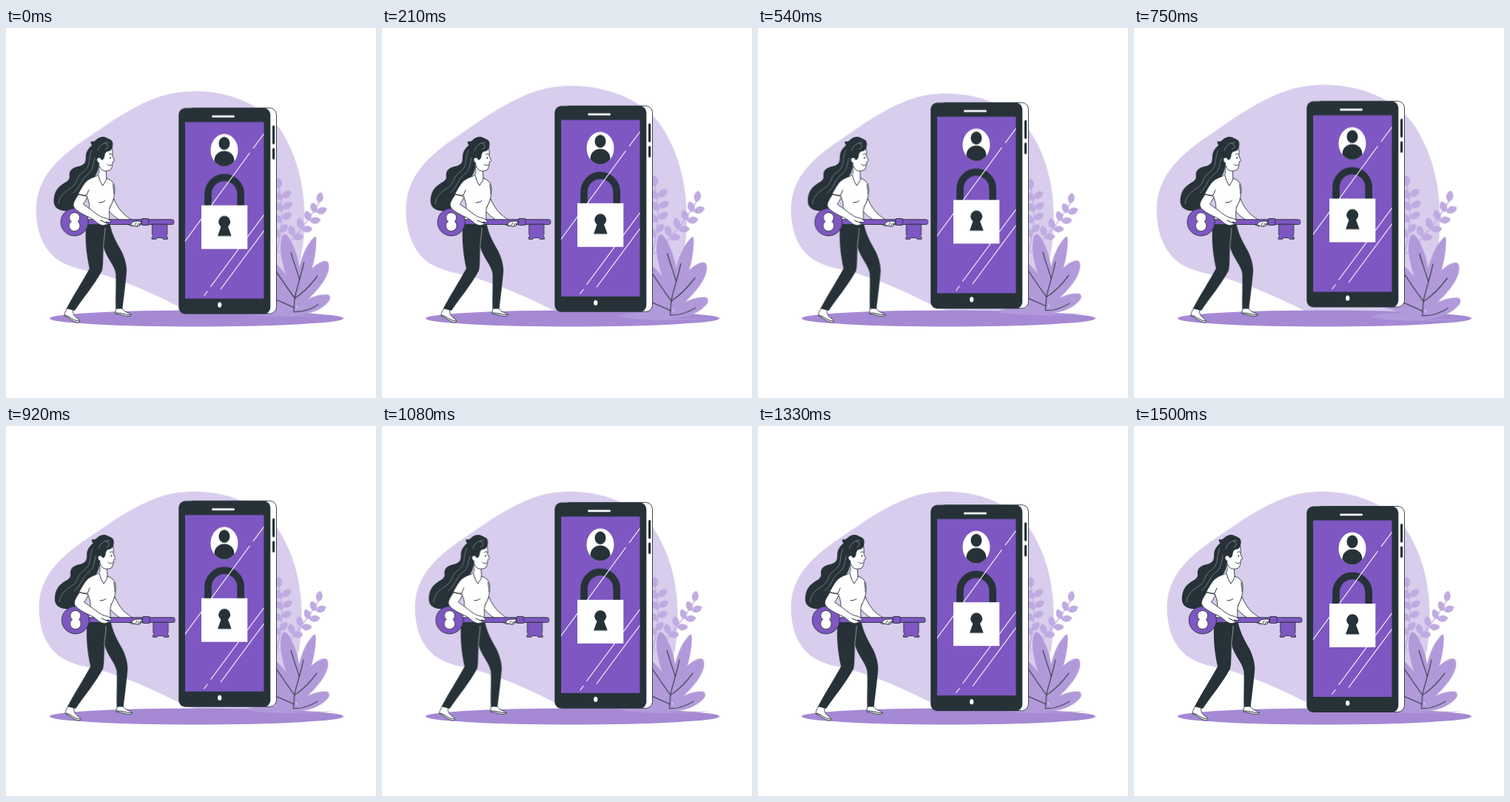
Recreate the animation shown at these times as an HTML page. Size 500 by 500 pixels, loop 1540 ms.

```html
<!DOCTYPE html>
<html lang="en">
<head>
<meta charset="utf-8">
<title>Unlock the phone</title>
<style>
  html, body { margin: 0; width: 100%; height: 100%; overflow: hidden; background: #fff; }
  svg { display: block; width: 100vw; height: 100vh; }

  .ink { fill: #263238; }
  .main { fill: #7e57c2; }
  .white { fill: #fff; }
  .leaf { fill: #b29ada; }
  .twig { fill: #bfabe1; }
  .line { fill: none; stroke: #263238; stroke-width: 1; stroke-linecap: round; stroke-linejoin: round; }
  .edge { stroke: #263238; stroke-width: .9; stroke-linejoin: round; stroke-linecap: round; }
  .glare { fill: none; stroke: #fff; stroke-width: 1.2; }
  .strand { fill: none; stroke: #b9c0c4; stroke-width: .5; }

  /* 1500 ms of motion, then a short rest */
  .beat, .float, .shake { animation: 1540ms linear -32ms infinite; }
  .beat { animation-name: beat; }
  .float { animation-name: float; }
  .shake { animation-name: shake; }
  .blob { --size: 1.1; transform-origin: 222.5px 239px; }
  .plants { --size: 1.085; transform-origin: 372px 272px; }

  @keyframes beat {
    0%, 29.22%, 38.96%, 58.44%, 100% { transform: scale(1); }
    9.74%, 48.7% { transform: scale(var(--size)); }
  }
  @keyframes float {
    0%, 97.4%, 100% { transform: translateY(0); }
    48.7% { transform: translateY(-10px); }
  }
  @keyframes shake {
    0%, 97.4%, 100% { transform: translateX(0); }
    9.74%, 87.66% { transform: translateX(-1px); }
    19.48%, 77.92% { transform: translateX(2px); }
    29.22%, 48.7%, 68.18% { transform: translateX(-4px); }
    38.96%, 58.44% { transform: translateX(4px); }
  }
</style>
</head>
<body>
<svg viewBox="0 0 500 500" xmlns="http://www.w3.org/2000/svg">
  <defs>
    <path id="sprig" d="M0 0C-6 -3 -6 -11 0 -14.5C6 -11 6 -3 0 0Z"/>
    <clipPath id="badge"><ellipse cx="295" cy="165.5" rx="18.5" ry="22"/></clipPath>
  </defs>

  <path class="beat blob" fill="#d8cded" d="M44.500 245C45 205 70 180 104 156C135 135 170 108 210 95C265 78 335 95 366 137C395 180 402 230 399 275C396 330 375 385 320 388C270 390 250 382 218 366C190 352 165 342 135 332C115 326 98 325 80 316C54 302 44.500 274 44.500 245Z"/>

  <ellipse cx="257.500" cy="392.500" rx="198.500" ry="11" fill="#a589d4"/>

  <g class="beat plants">
    <g class="twig">
      <path d="M365 305C372 280 376 255 369 216M367 304C388 286 405 266 423 235" fill="none" stroke="#bfabe1" stroke-width="1.300"/>
      <use href="#sprig" transform="translate(368.500 218)"/>
      <use href="#sprig" transform="translate(373 230) rotate(55)"/>
      <use href="#sprig" transform="translate(374 244) rotate(62)"/>
      <use href="#sprig" transform="translate(373 258) rotate(62)"/>
      <use href="#sprig" transform="translate(373 233) rotate(-42)"/>
      <use href="#sprig" transform="translate(374 248) rotate(-40)"/>
      <use href="#sprig" transform="translate(372 263) rotate(-45)"/>
      <use href="#sprig" transform="translate(370 276) rotate(45)"/>
      <use href="#sprig" transform="translate(370 282) rotate(-40)"/>
      <use href="#sprig" transform="translate(422 237) rotate(10)"/>
      <use href="#sprig" transform="translate(419 250) rotate(68)"/>
      <use href="#sprig" transform="translate(418 250) rotate(-22)"/>
      <use href="#sprig" transform="translate(410 261) rotate(84)"/>
      <use href="#sprig" transform="translate(410 261) rotate(-22)"/>
      <use href="#sprig" transform="translate(399 272) rotate(88)"/>
      <use href="#sprig" transform="translate(399 271) rotate(-16)"/>
      <use href="#sprig" transform="translate(387 282) rotate(90)"/>
      <use href="#sprig" transform="translate(388 281) rotate(-18)"/>
    </g>
    <g class="leaf">
      <path d="M391 364C378 335 366 302 373 281C375 277 379 278 382 283C392 299 398 320 397 342Z"/>
      <path d="M392 362C391 325 402 295 416 282C418 281 419 283 418.500 289C418 313 410 340 394 363Z"/>
      <path d="M389 366C397 338 414 317 430 314C435 314 436 319 435 325C432 342 413 361 394 377Z"/>
      <path d="M387 384C397 369 414 358 433 358.500C438 359.500 438 365 434 369C424 380 408 386 387 386Z"/>
      <path d="M391 386C398 360 380 322 350 308C345 320 352 345 360 355C340 354 330 362 334 368C346 374 358 376 366 378C345 377 328 380 323 383C340 389 400 389 442 386Z"/>
    </g>
    <path class="line" d="M385 303C388 315 393 327 396 338M402 316C398 335 391 355 390 363C389 370 389 376 388.500 381.500M420 334C412 345 400 357 390 363.500C381 352 370 335 362 323M421 372C410 379 400 382 388.500 381.500M389 376C379 371 368 367 360 363"/>
  </g>

  <g class="float">
    <rect class="white edge" x="245" y="108.500" width="120.500" height="278" rx="9"/>
    <rect class="ink" x="233.300" y="108.500" width="124" height="278.500" rx="9"/>
    <rect class="ink" x="360" y="132" width="3.200" height="25.500" rx="1.500"/>
    <rect class="ink" x="360" y="162.500" width="3.200" height="15.500" rx="1.500"/>
    <rect class="main" x="242" y="127.500" width="106.500" height="238.500"/>
    <rect class="white" x="278" y="118.500" width="31" height="2.800" rx="1.400"/>
    <ellipse class="white" cx="288.700" cy="374.500" rx="2.700" ry="3.500"/>

    <ellipse class="white" cx="295" cy="165.500" rx="18.500" ry="22"/>
    <g class="ink" clip-path="url(#badge)">
      <ellipse cx="295" cy="156.300" rx="7.500" ry="8.700"/>
      <path d="M281.500 188V180C281.500 162 308.500 162 308.500 180V188Z"/>
    </g>

    <path d="M273 241V225A22 22.500 0 0 1 317.200 225V241" fill="none" stroke="#263238" stroke-width="9.600"/>
    <rect class="white" x="264" y="240" width="62.300" height="59"/>
    <circle class="ink" cx="295.200" cy="262.300" r="8"/>
    <path class="ink" d="M291.500 266H299L304.700 281.500H286Z"/>
    <path class="glare" d="M242 288.500L329.500 169M334 163L348.500 143.500M348.500 253L276.500 350M272.500 356L267.500 362.500M348.500 274.500L290 353.500"/>
  </g>

  <g class="shake">
    <!-- hair behind -->
    <path class="ink" d="M140 150C132 146 126 150 123 155C114 158 108 166 108 174C108 181 107 185 98 187C88 189 85 194 86 201C86 207 80 208 74 213C66 219 64 229 65 237C67 246 78 249 89 246C97 243 101 236 100 226C104 211 113 205 120 201C124 196 125 190 126 182Z"/>
    <path class="strand" d="M116 165C110 178 116 186 104 195C94 202 98 209 88 216C78 222 72 228 71 238M121 173C117 184 119 192 110 198C101 205 101 215 91 223"/>

    <!-- shoes and trousers -->
    <path class="white edge" d="M82.500 379C81 383 78 386 79.500 389C85 391 89 396 96 398C99 398.500 101 397 99 394.500C95 391 90 389 90.500 381Z"/>
    <path class="line" d="M79.500 388C86 389 91 396 99 396"/>
    <path class="white edge" d="M149.500 378C149 381 147 384 148.500 386.500C155 386.500 160 390 166 389.500C170 389 170 387 167 385.500C162 384 158 382 157 378Z"/>
    <path class="line" d="M148.500 385C156 384.500 161 388 169 387.500"/>
    <path class="ink" d="M109 262C106 283 109 307 113 325C102 345 92 360 82 379L93 382C106 363 119 348 130 328C132 320 131 307 132 297C137 312 147 321 148.500 332C149 350 148 363 148.500 379.500H157.500C160 360 162 343 163.300 328C163 318 160 309 156 301C149 289 143 278 140 262Z"/>
    <path d="M134 270C134 282 131 291 132 299" fill="none" stroke="#fff" stroke-width=".5"/>

    <!-- far arm -->
    <path class="white edge" d="M146 231C149 239 154 246 159 251C165 256 170 260 176 261L171 268C160 264 147 257 139 247Z"/>

    <!-- neck and shirt -->
    <path class="white edge" d="M125 188C127 195 126 199 120 201C111 204 107 208 103 215L97 225L110 229C115 240 113 251 108 265H140C140 255 139 247 141 241C145 235 147 227 147 218C147 210 144 206 136 203L135 190Z"/>
    <path class="line" d="M125 199C126 204 128 209 131 213C133 209 136 207 136 203M126 236C129 236 132 235 134 233.500M145 211C144 216 147 218 146 224"/>

    <!-- face -->
    <path class="white edge" d="M126 170C124 179 125 187 129 191C132 194 138 194 142 191C144 188 144 183 144.500 180.500C146 180.500 147 179.500 146.500 178.500L144 173C144.500 168 144 164 143 160L130 162Z"/>
    <path class="line" d="M139.500 171C141 169.500 142.500 169.500 143.500 170.500M137 184C139 186.500 141.500 186 143 184.500"/>
    <ellipse class="ink" cx="141.300" cy="175.500" rx=".8" ry="1.300"/>
    <path class="ink" d="M124 188C121 178 118 168 119 160C116 159 114 156 115 153C118 154 120 153 122 151C127 146 135 146 138 150C143 150 145 154 144.500 158C144 163 142 166 139 166.500C136 167 134 168 133.500 173C133 177 131 179 128 178Z"/>
    <path class="white" d="M128.500 177C126 174 122.500 176 123.500 179C124 182 127 183 129 181.500Z"/>
    <path class="strand" d="M139 155C132 154 126 159 124 166M134 156C140 158 139 162 134 164"/>

    <!-- key -->
    <g class="main edge">
      <rect x="108" y="258.800" width="119" height="6.700" rx="2.500"/>
      <path d="M197.800 265.500V279L199 281L197.300 283V285.300H203L204.500 283.500H211L212.500 285.300H218.500V283L216.800 281L218 279V265.500Z"/>
      <rect x="183.500" y="257.500" width="9.500" height="9" rx="1"/>
      <circle cx="92.800" cy="262.300" r="18.600"/>
      <path class="white" d="M88 261.500C83 256 87 249.500 92.700 249.500C98.500 249.500 102.500 256 97.500 261.500C103 267 99 274.500 92.700 274.500C86.500 274.500 82.500 267 88 261.500Z"/>
    </g>

    <!-- near arm and hands -->
    <path class="white edge" d="M98 225C94 231 90 237 91.500 241C93 246 104 252 113 256C120 259 122 263 127 265.500C131 267.500 136 267 138 265L135 262L141 263C142 261 139 258 135 257C128 256 122 251 117 247L104.500 238C107 235 109 231 110 228Z"/>
    <path class="white" d="M98 223.500L110 226L114 214L104 214Z"/>
    <path class="line" d="M103 214L97.500 224C101 226 105 226.500 109 226L112 219M128 260L137 264M134 266L139 266"/>
    <path class="white edge" d="M170 263C173 261 178 260.500 183 261.500L182 264.500C181 268 177 269 173 267.500L169 266Z"/>
    <path class="line" d="M174 267L176 263M177 268L179 264M180 267L181 264"/>
  </g>
</svg>
</body>
</html>
```
